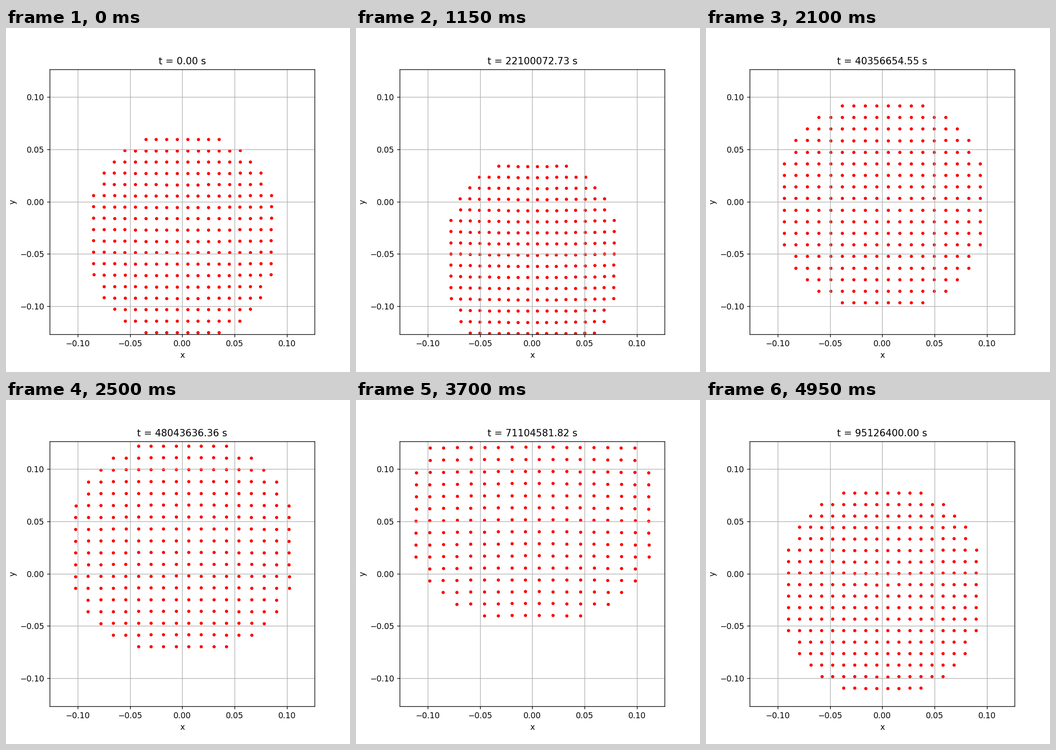
These frames come from a looping animation (748x748 px, 5000 ms). A matplotlib script:

```python
import numpy as np
import matplotlib.pyplot as plt
from matplotlib.animation import FuncAnimation

SIZE, DPI = 748, 125
FRAMES, INTERVAL = 100, 50
DURATION = 95126400.0  # simulated seconds
LIMIT = 0.1267

# Square lattice trimmed to a disc, in units of the dot spacing
steps = np.arange(-8.5, 9)
col, row = (a.ravel() for a in np.meshgrid(steps, steps))
inside = col**2 + row**2 < 90
col, row = col[inside], row[inside]


def positions(frame):
    """Dots swing up and down; the lattice widens as it rises."""
    swing = np.sin(np.radians(-147.7 + 3.464 * frame))
    x = col * (0.01111 + swing * (0.00209 - 7e-6 * row))
    y = swing * 0.0607 + row * (0.0111 + 0.00045 * swing)
    y += swing * (9.2e-6 * row**2 - 1.75e-5 * col**2)
    return np.column_stack([x, y])


fig, ax = plt.subplots(figsize=(SIZE / DPI, SIZE / DPI), dpi=DPI)
ax.set_aspect("equal")
ax.set_xlim(-LIMIT, LIMIT)
ax.set_ylim(-LIMIT, LIMIT)
ax.set_xlabel("x")
ax.set_ylabel("y")
ax.grid(True)
dots = ax.scatter(*positions(0).T, c="red", marker=".")
title = ax.set_title("t = 0.00 s")


def update(frame):
    dots.set_offsets(positions(frame))
    title.set_text(f"t = {DURATION * frame / (FRAMES - 1):.2f} s")
    return dots, title


anim = FuncAnimation(fig, update, frames=FRAMES, interval=INTERVAL,
                     repeat=True, repeat_delay=0)
plt.show()
```
